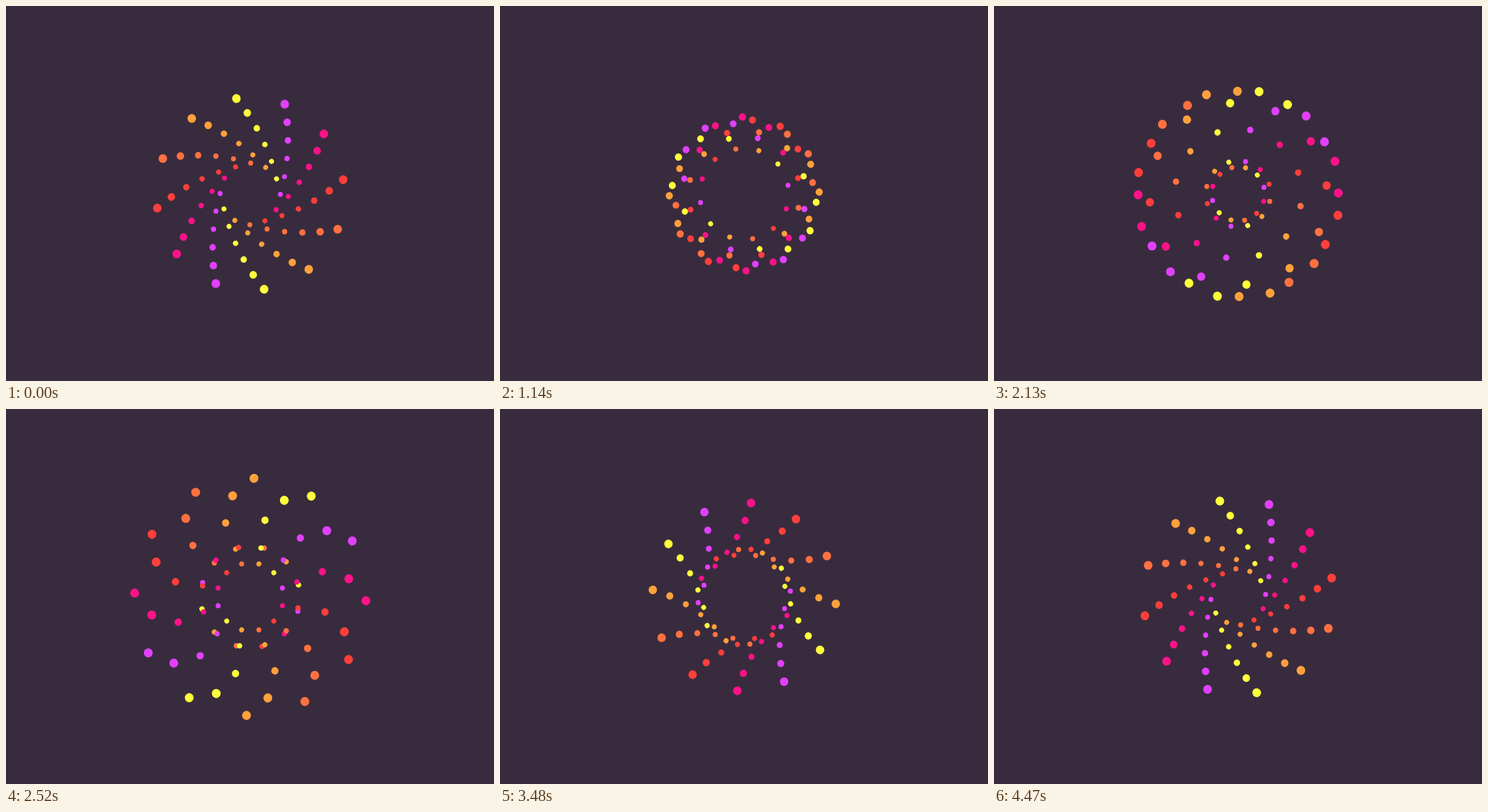
Animation, 750 px wide and 577 px high, one loop 4.5 s. Source, as an HTML page with a canvas:

```html
<!DOCTYPE html>
<html lang="en">
<head>
<meta charset="utf-8">
<title>Spiral dots</title>
<style>
  html, body { margin: 0; height: 100%; overflow: hidden; background: #392b3e; }
  canvas { display: block; }
</style>
</head>
<body>
<canvas id="stage" width="750" height="577"></canvas>
<script>
const ctx = document.getElementById('stage').getContext('2d');
const COLORS = ['#ff7140', '#ffa13b', '#ffff3c', '#e040fb', '#fc1289', '#ff3f3b'];
const LOOP = 4500, STEP = 30;
const ORBIT_TIME = 4529;              // slightly longer than the loop, so the restart skips a little
const ARMS = 12, DOTS = 6;
const ORBIT_X = 66.6, ORBIT_R = 86;   // circle followed by the first dot of an arm
const PIVOT = 40, SHIFT = 26.85;      // each next dot: turn about the pivot, then shift
const RAD = Math.PI / 180;

const dotSize = r => Math.min(6.8, Math.max(3.8, 1.25 + 0.037 * r));

// Dots of one arm lying along the x axis
function armDots(time) {
  const phase = 38 * RAD + 2 * Math.PI * time / ORBIT_TIME;
  const turn = (24 - 23.65 * Math.cos(phase)) * RAD;
  const cos = Math.cos(turn), sin = Math.sin(turn);
  let x = ORBIT_X + ORBIT_R * Math.cos(phase);
  let y = ORBIT_R * Math.sin(phase);
  const px = x - PIVOT, py = y;
  const dots = [];
  for (let i = 0; i < DOTS; i++) {
    dots.push([x, y, dotSize(Math.hypot(x, y))]);
    const dx = x - px, dy = y - py;
    x = px - SHIFT + dx * cos - dy * sin;
    y = py + dx * sin + dy * cos;
  }
  return dots;
}

function draw() {
  const time = Math.floor(performance.now() % LOOP / STEP) * STEP;
  const dots = armDots(time);
  ctx.resetTransform();
  ctx.fillStyle = '#392b3e';
  ctx.fillRect(0, 0, 750, 577);
  ctx.translate(375.4, 289.1);
  ctx.scale(1, 1.027);
  for (let arm = 0; arm < ARMS; arm++) {
    ctx.fillStyle = COLORS[arm % COLORS.length];
    for (const [x, y, size] of dots) {
      ctx.beginPath();
      ctx.arc(x, y, size, 0, 2 * Math.PI);
      ctx.fill();
    }
    ctx.rotate(2 * Math.PI / ARMS);
  }
  requestAnimationFrame(draw);
}
draw();
</script>
</body>
</html>
```
